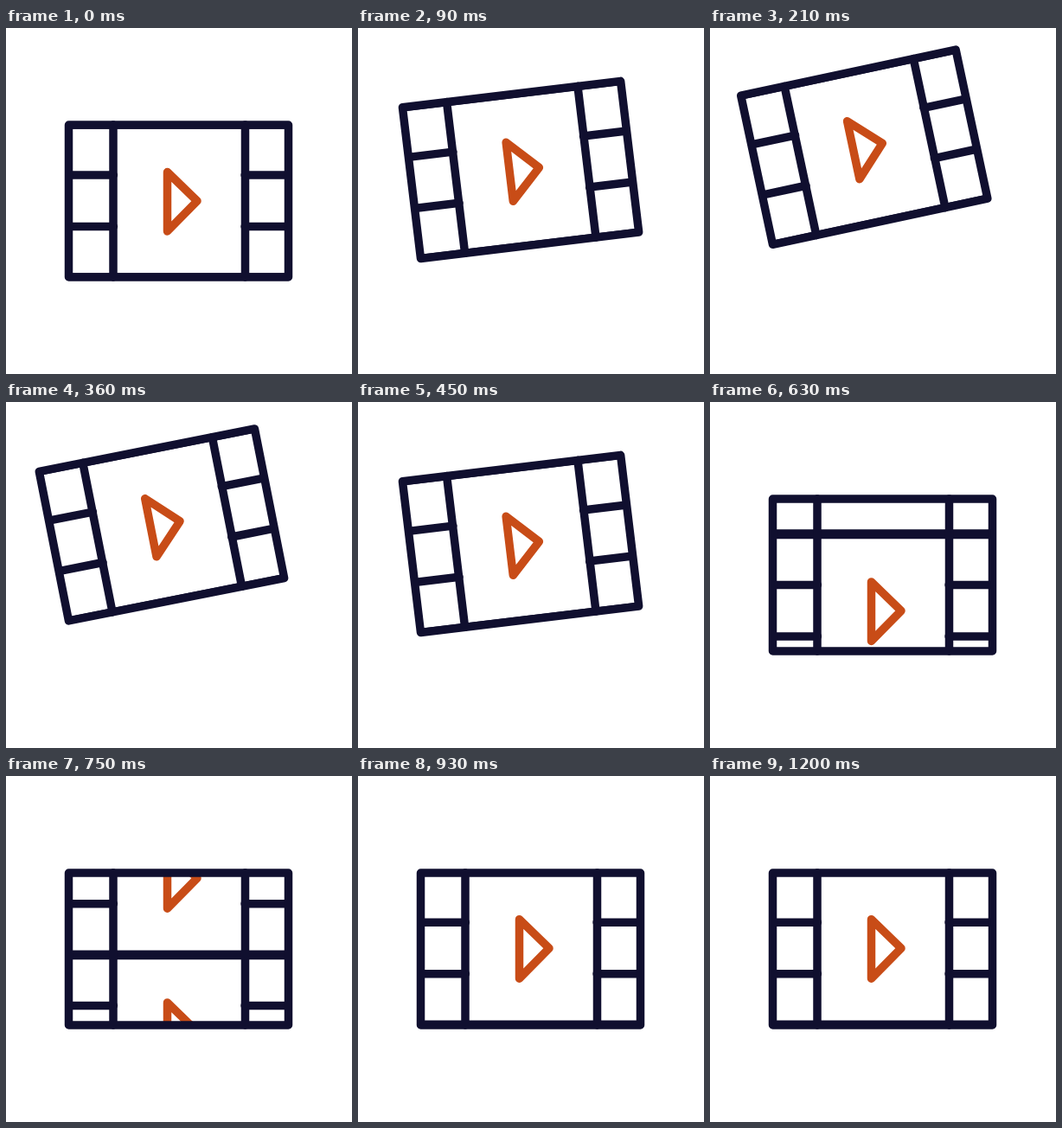
Animation, 400 px wide and 400 px high, one loop 3260 ms. Source, as an HTML page:

```html
<!DOCTYPE html>
<html lang="en">
<head>
<meta charset="utf-8">
<title>Film strip</title>
<style>
  html, body { margin: 0; width: 100%; height: 100%; overflow: hidden; background: #fff; }
  svg { display: block; width: 100vw; height: 100vh; }
  path, rect { fill: none; stroke: #100f2f; stroke-width: 9.5; stroke-linecap: round; stroke-linejoin: round; }
  .play { stroke: #c84c17; }
  clipPath rect { stroke: none; fill: #000; }
</style>
</head>
<body>
<svg viewBox="0 0 400 400">
  <defs>
    <clipPath id="window"><rect x="72.5" y="112" width="254" height="176"/></clipPath>
    <g id="cell">
      <path class="play" d="M186.5 166.5L221 200L186.5 235Z"/>
      <path d="M72.5 112H326.5M72.5 288H326.5"/>
      <path d="M72.5 170H124.4M72.5 229.5H124.4M276.1 170H326.5M276.1 229.5H326.5"/>
    </g>
  </defs>
  <g id="film">
    <g clip-path="url(#window)">
      <use id="lower" href="#cell"/>
      <use id="upper" href="#cell"/>
    </g>
    <path d="M124 112V288M276.5 112V288"/>
    <rect x="72.5" y="112" width="254" height="176"/>
  </g>
</svg>
<script>
  const LOOP = 3260, STEP = 30;
  const PIVOT = { x: 72.5, y: 288 };
  const TOSS = { peak: 270, angle: 12.8, lift: 40, power: 1.9 };
  const ROLL = { start: 538, end: 930, travel: 176.5, pitch: 177.3 };

  const byId = id => document.getElementById(id);
  const film = byId("film"), lower = byId("lower"), upper = byId("upper");
  const clamp = (v, lo, hi) => Math.min(hi, Math.max(lo, v));
  const shift = (el, y) => el.setAttribute("transform", `translate(0 ${y.toFixed(3)})`);

  // Height of the hop, 0 at rest and 1 at the top
  function toss(t) {
    const u = Math.abs(t / TOSS.peak - 1);
    return u < 1 ? 1 - Math.pow(u, TOSS.power) : 0;
  }

  function roll(t) {
    return ROLL.travel * clamp((t - ROLL.start) / (ROLL.end - ROLL.start), 0, 1);
  }

  function draw(time) {
    const t = Math.floor((time % LOOP) / STEP) * STEP;
    const hop = toss(t), y = roll(t);
    film.setAttribute("transform",
      `translate(0 ${-TOSS.lift * hop}) rotate(${-TOSS.angle * hop} ${PIVOT.x} ${PIVOT.y})`);
    shift(lower, y);
    shift(upper, y - ROLL.pitch);
  }

  const begin = performance.now();
  function tick(now) {
    draw(Math.max(0, now - begin));
    requestAnimationFrame(tick);
  }
  draw(0);
  requestAnimationFrame(tick);
</script>
</body>
</html>
```
